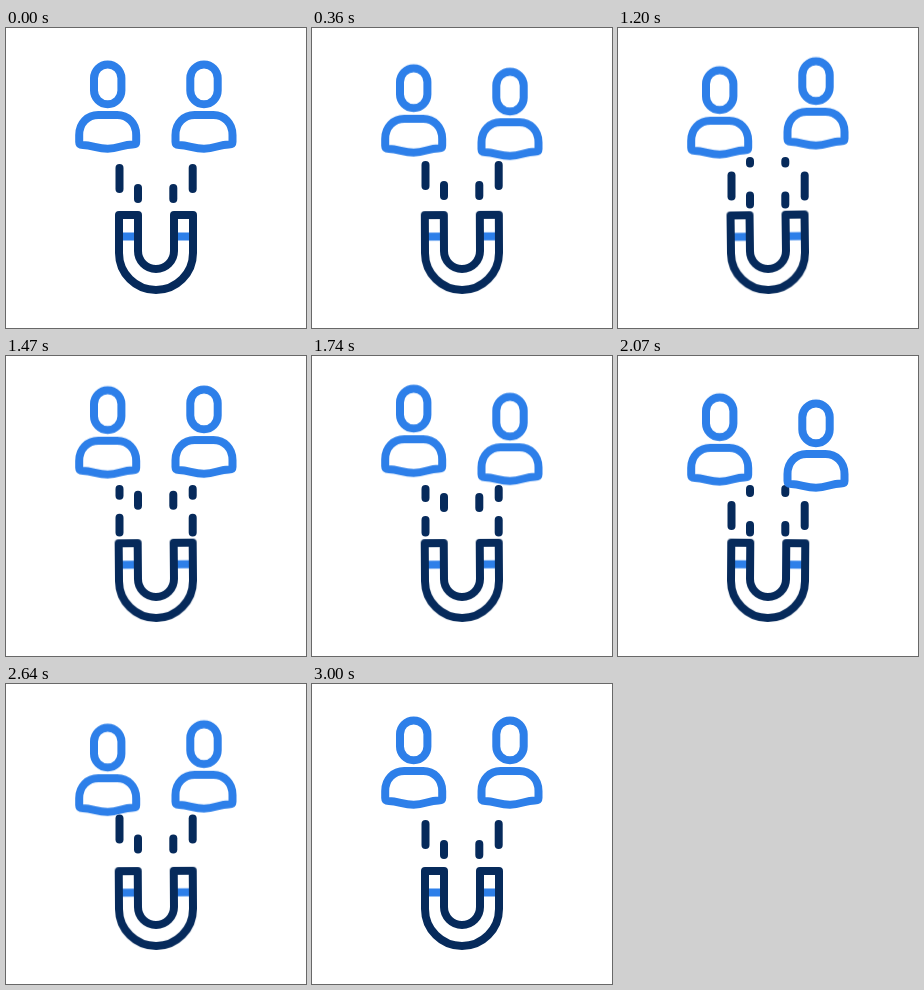
Animation, 300 px wide and 300 px high, one loop 3.59 s. Source, as an HTML page:

```html
<!DOCTYPE html>
<html lang="en">
<head>
<meta charset="utf-8">
<title>Magnet attracting people</title>
<style>
  html, body { margin: 0; width: 100%; height: 100%; overflow: hidden; background: #fff; }
  svg { display: block; width: 100vw; height: 100vh; }

  .person, .magnet, .dash {
    animation: 3590ms cubic-bezier(.37, 0, .63, 1) infinite;
  }
  .person, .line { fill: none; stroke-width: 8; stroke-linecap: round; stroke-linejoin: round; }
  .person, .band { stroke: #2d7fe9; }
  .line { stroke: #062a5b; }
  .band { fill: none; stroke-width: 8; }

  .left { animation-name: bob-left; }
  .right { animation-name: bob-right; }
  .magnet { animation-name: sway; transform-origin: 150px 225px; }

  .dash { animation-name: pull; }
  .outer { --start: -7px; stroke-dasharray: 21 22; }
  .inner { --start: -27px; stroke-dasharray: 11 32; }

  @keyframes bob-left {
    0%, 83.57%, 100% { transform: translateY(0); }
    25.07%, 66.85% { transform: translateY(11px); }
    45.96% { transform: translateY(-4.3px); }
  }
  @keyframes bob-right {
    0%, 83.57%, 100% { transform: translateY(0); }
    16.71%, 58.5% { transform: translateY(11px); }
    36.77% { transform: translateY(-4.3px); }
  }
  @keyframes pull {
    0%, 83.57%, 100% { stroke-dashoffset: var(--start); }
    22.28%, 69.36% { stroke-dashoffset: calc(var(--start) + 7px); }
    45.96% { stroke-dashoffset: calc(var(--start) - 25px); }
  }
  @keyframes sway {
    0%, 83.57%, 100% { transform: rotate(0); }
    26.46% { transform: rotate(-.8deg); }
    48.47% { transform: rotate(-.4deg); }
    59.89% { transform: rotate(.5deg); }
    72.42% { transform: rotate(-.4deg); }
  }
</style>
</head>
<body>
<svg viewBox="0 0 300 300">
  <defs>
    <g id="person">
      <rect x="-13.7" y="36.5" width="27.4" height="39.8" rx="13.7"/>
      <path d="M-28.5 114V107C-28.5 95 -20 87 -9.5 87H9.5C20 87 28.5 95 28.5 107V114Q28.5 116.5 25 116.5C15 116.5 11 120.7 0 120.7S-15 117 -25 117Q-28.5 117 -28.5 114Z"/>
    </g>
  </defs>

  <g class="line">
    <path class="dash outer" d="M113.5 133V176.5"/>
    <path class="dash inner" d="M132 133V176.5"/>
    <path class="dash inner" d="M167.3 133V176.5"/>
    <path class="dash outer" d="M186.7 133V176.5"/>
  </g>

  <g class="magnet">
    <path class="band" d="M113 208.5H132M168 208.5H187"/>
    <path class="line" d="M113 187V225A37 37 0 0 0 187 225V187H168V223A18 18 0 0 1 132 223V187Z"/>
  </g>

  <g class="person left"><use href="#person" x="101.7"/></g>
  <g class="person right"><use href="#person" x="198"/></g>
</svg>
</body>
</html>
```
